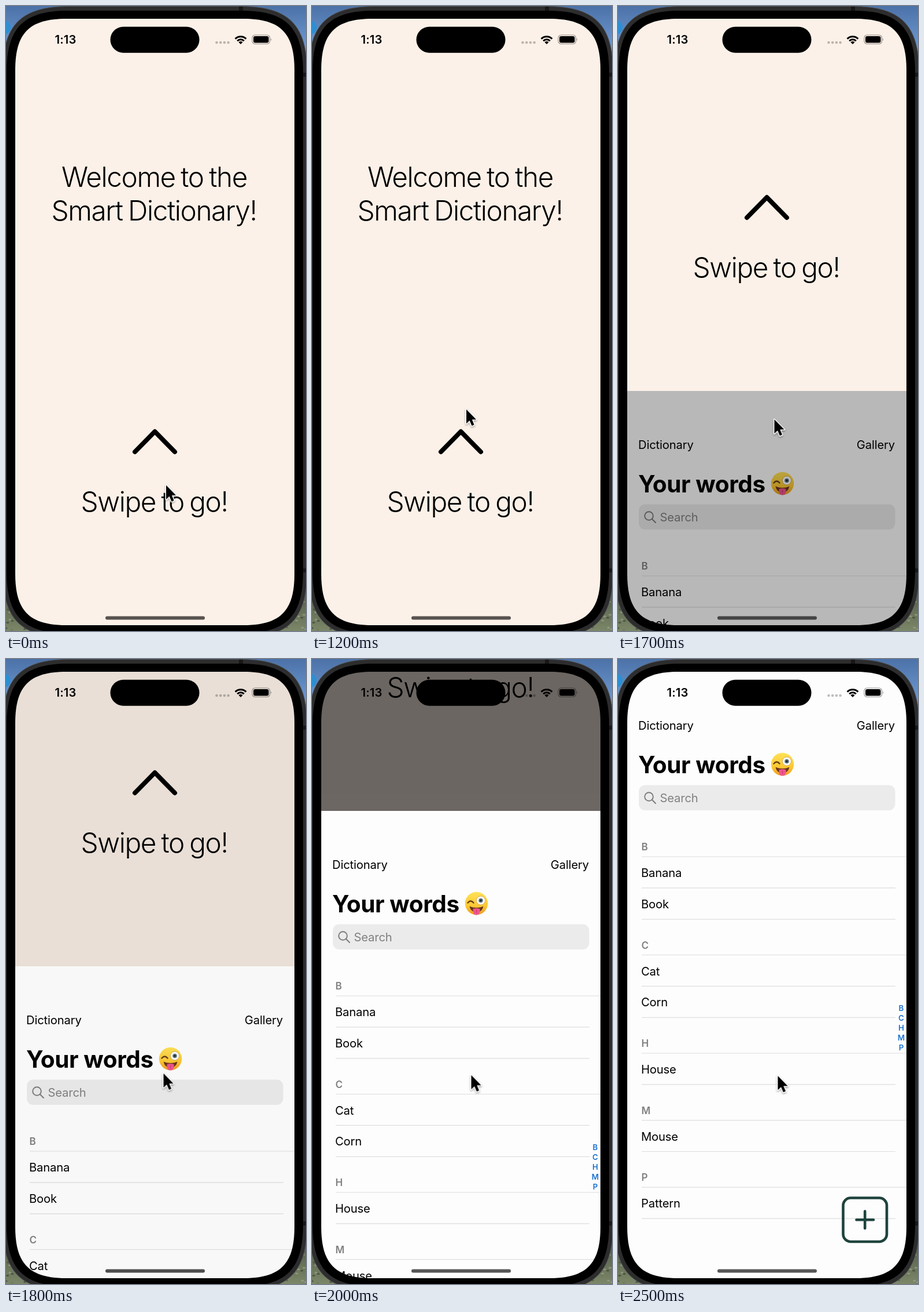
These frames come from a looping animation (519x1078 px, 2.6 s). An HTML page:

```html
<!DOCTYPE html>
<html lang="en">
<head>
<meta charset="utf-8">
<title>Word list</title>
<style>
  html, body { margin: 0; width: 100%; height: 100%; overflow: hidden; background: #000; }
  svg { display: block; width: 519px; height: 1078px; }
  text { font: 400 20.2px Inter, "Open Sans", sans-serif; font-optical-sizing: none; letter-spacing: -.15px; }
  .hero { font-size: 47.7px; font-weight: 300; letter-spacing: -1.4px; word-spacing: -2.5px; text-anchor: middle; }
  .title { font-size: 40.5px; font-weight: 700; letter-spacing: -.4px; }
  .clock { font-weight: 600; letter-spacing: .2px; }
  .head { font-size: 17px; font-weight: 600; fill: #808080; }
  .index { font-size: 13.4px; font-weight: 600; fill: #1a73d4; text-anchor: middle; letter-spacing: 0; }
  .end { text-anchor: end; }
  .line { fill: none; stroke-linecap: round; stroke-linejoin: round; }
</style>
</head>
<body>
<svg viewBox="0 0 519 1078">
  <defs>
    <linearGradient id="sky" x2="0" y2="1">
      <stop stop-color="#4c72a8"/><stop offset="1" stop-color="#75a3dc"/>
    </linearGradient>
    <linearGradient id="grass" x2="0" y2="1">
      <stop stop-color="#4c5743"/><stop offset="1" stop-color="#7c8668"/>
    </linearGradient>
    <linearGradient id="face" x2="0" y2="1">
      <stop stop-color="#ffe257"/><stop offset=".6" stop-color="#fcc935"/><stop offset="1" stop-color="#ee9a22"/>
    </linearGradient>
    <clipPath id="screen"><path id="screenShape"/></clipPath>
    <filter id="shadow" x="-50%" y="-50%" width="200%" height="200%">
      <feDropShadow dx="0" dy="1.5" stdDeviation="1.5" flood-opacity=".4"/>
    </filter>
  </defs>

  <!-- desktop behind the phone -->
  <rect width="519" height="90" fill="url(#sky)"/>
  <circle cx="-4" cy="37" r="12" fill="#2c8fd3"/>
  <rect y="1000" width="519" height="78" fill="url(#grass)"/>
  <g id="blades"></g>

  <!-- phone body -->
  <path id="frame" fill="#2d2d2e" stroke="#55585c"/>
  <path d="M403 1h7v7h-7zM514 115h5v7h-5zM514 970h5v7h-5z" fill="#171717"/>
  <path id="bezel"/>

  <g clip-path="url(#screen)">
    <g id="welcome">
      <rect x="16" y="22" width="483" height="1046" fill="#fcf1e8"/>
      <text class="hero" x="256.5" y="311.5">Welcome to the</text>
      <text class="hero" x="256" y="370">Smart Dictionary!</text>
      <path class="line" d="M223 769L257.5 734L292 769" stroke="#000" stroke-width="8"/>
      <text class="hero" x="256.5" y="872">Swipe to go!</text>
    </g>
    <g id="words">
      <rect x="16" y="22" width="483" height="1046" fill="#fdfdfd"/>
      <text x="35" y="122">Dictionary</text>
      <text class="end" x="479" y="122">Gallery</text>
      <text class="title" x="35" y="196.5">Your words</text>
      <g transform="translate(284.5 181.5)">
        <circle r="19.7" fill="url(#face)"/>
        <path class="line" d="M-15 -1Q-10 -7 -5 -1" stroke="#66401a" stroke-width="2.4"/>
        <circle cx="7.5" cy="-5" r="7.6" fill="#fff" stroke="#c99a3c" stroke-width=".8"/>
        <circle cx="7.5" cy="-5" r="3.8" fill="#5c7686"/>
        <circle cx="7.5" cy="-5" r="1.8" fill="#1d2428"/>
        <path d="M-12 5Q0 10 12 5Q10 15 0 15.5Q-10 15 -12 5Z" fill="#69351a"/>
        <path d="M-6 9.5Q0 7.5 6 9.5V14.5Q5 20 0 20T-6 14.5Z" fill="#f0568f"/>
        <path class="line" d="M0 11V16" stroke="#cb3b70" stroke-width="1.2"/>
      </g>
      <rect x="36" y="217.5" width="443.5" height="43.5" rx="11" fill="#ebebeb"/>
      <g class="line" stroke="#7b7b7d" stroke-width="1.9">
        <circle cx="53.5" cy="237.5" r="7.3"/><path d="M59 243L65 249"/>
      </g>
      <text x="72.5" y="247" fill="#808080">Search</text>
      <g id="list"></g>
      <g class="line" stroke="#1f433d" stroke-width="4.6">
        <rect x="389.5" y="929.5" width="75.5" height="75.5" rx="13"/>
        <path d="M412.5 967.3H442M427.2 952.5V982"/>
      </g>
    </g>
    <rect id="bar" x="172" y="1052.5" width="172" height="6" rx="3"/>
  </g>

  <!-- status bar -->
  <rect x="180.5" y="35.7" width="154" height="45" rx="22.5"/>
  <text class="clock" x="84.5" y="65">1:13</text>
  <g fill-opacity=".25">
    <circle cx="364.5" cy="63" r="2.3"/><circle cx="371.2" cy="63" r="2.3"/>
    <circle cx="377.9" cy="63" r="2.3"/><circle cx="384.6" cy="63" r="2.3"/>
  </g>
  <path d="M406 66L402.5 62.5A5 5 0 0 1 409.5 62.5Z"/>
  <path d="M400.2 60.2A8.2 8.2 0 0 1 411.8 60.2M396.6 56.6A13.3 13.3 0 0 1 415.4 56.6" fill="none" stroke="#000" stroke-width="3"/>
  <rect x="426" y="50" width="30.5" height="15.5" rx="5" fill="none" stroke="#000" stroke-opacity=".4" stroke-width="1.2"/>
  <rect x="428" y="52" width="26.5" height="11.5" rx="3.3"/>
  <path d="M458 55.5Q460 57.8 458 60.2Z" fill-opacity=".45"/>

  <g id="cursor">
    <path d="M0 0V24.5L5.6 19.2L9.5 28.2L13.6 26.5L9.8 17.6H17.2Z" stroke="#fff" stroke-width="3"
      stroke-linejoin="round" paint-order="stroke" filter="url(#shadow)"/>
  </g>
</svg>
<script>
const LOOP = 2600, STEP = 100;
const TOP = 22, BOTTOM = 1068;
const byId = id => document.getElementById(id);

// Rounded box whose corners ease into the sides, as on the phone
function smoothBox(id, x, y, w, h, r) {
  const far = 1.28 * r, near = .355 * r, right = x + w, bottom = y + h;
  byId(id).setAttribute('d', `M${x} ${y + far}
    C${x} ${y + near} ${x + near} ${y} ${x + far} ${y}H${right - far}
    C${right - near} ${y} ${right} ${y + near} ${right} ${y + far}V${bottom - far}
    C${right} ${bottom - near} ${right - near} ${bottom} ${right - far} ${bottom}H${x + far}
    C${x + near} ${bottom} ${x} ${bottom - near} ${x} ${bottom - far}Z`);
}
smoothBox('screenShape', 16, TOP, 483, BOTTOM - TOP, 69);
smoothBox('bezel', 1, 8, 513, 1074, 83);
smoothBox('frame', -6, .5, 527, 1089, 90);

// Word list
const sections = { B: ['Banana', 'Book'], C: ['Cat', 'Corn'], H: ['House'], M: ['Mouse'], P: ['Pattern'] };
const label = (cls, x, y, s) => `<text class="${cls}" x="${x}" y="${y}">${s}</text>`;
const rule = (y, end) => `<path d="M41 ${y}H${end}" stroke="#dedede" stroke-width="1.2"/>`;
let lineY = 341, list = '';
Object.entries(sections).forEach(([letter, words], i) => {
  list += label('head', 40.5, lineY - 11, letter) + rule(lineY, 499);
  for (const word of words) {
    list += label('', 40, lineY + 35, word);
    lineY += 53.9;
    list += rule(lineY, 480);
  }
  lineY += 61.7;
  list += label('index', 490, 607 + i * 16.9, letter);
});
byId('list').innerHTML = list;

// Grass texture in the lower corners
let seed = 7;
const random = () => (seed = seed * 16807 % 2147483647) / 2147483647;
byId('blades').innerHTML = Array.from({ length: 120 }, (_, i) => {
  const x = (i % 2 ? 465 : 0) + random() * 54, y = 1015 + random() * 63;
  const color = ['#39402f', '#a0a78f', '#6c7659'][i % 3];
  return `<ellipse cx="${x}" cy="${y}" rx="2.6" ry="1.5" fill="${color}" opacity=".65"/>`;
}).join('');

// Tracks: [time, value, ...]
const edgeTrack = [[1300, 1068], [1400, 1066], [1500, 932], [2000, 262], [2100, 153],
  [2200, 85], [2300, 48], [2400, 30], [2500, 22]];
const cursorTrack = [[0, 277, 826.5], [200, 276, 819], [500, 272, 777], [800, 268, 725], [1100, 267, 696],
  [1500, 267, 695], [1600, 268, 705], [1700, 270.5, 713], [1900, 274.5, 716.5], [2100, 276.5, 719]];
const barTrack = [[1400, 88, 83, 80], [1500, 51, 51, 50], [1700, 68, 68, 68], [1900, 86, 86, 86]];

function sample(track, t) {
  const next = track.findIndex(key => key[0] > t);
  if (next < 0) return track.at(-1).slice(1);
  if (next === 0) return track[0].slice(1);
  const a = track[next - 1], b = track[next], k = (t - a[0]) / (b[0] - a[0]);
  return a.slice(1).map((v, i) => v + (b[i + 1] - v) * k);
}

function play(id, pose) {
  const frames = [];
  for (let t = 0; t <= LOOP; t += STEP)
    frames.push({ ...pose(Math.min(t, LOOP - STEP)), offset: t / LOOP, easing: 'steps(1, end)' });
  byId(id).animate(frames, { duration: LOOP, iterations: Infinity });
}

const shift = (x, y) => `translate(${x}px, ${y}px)`;
const fade = share => Math.max(0, Math.min(1, 1.95 * share - .02));
const page = (rest, share) => t => {
  const [edge] = sample(edgeTrack, t);
  return { transform: shift(0, edge - rest), opacity: fade(share(edge)) };
};

play('welcome', page(BOTTOM, edge => (edge - TOP) / (BOTTOM - TOP)));
play('words', page(TOP, edge => (BOTTOM - edge) / (BOTTOM - TOP)));
play('cursor', t => ({ transform: shift(...sample(cursorTrack, t)) }));
play('bar', t => ({ fill: `rgb(${sample(barTrack, t).map(Math.round)})` }));
</script>
</body>
</html>
```
